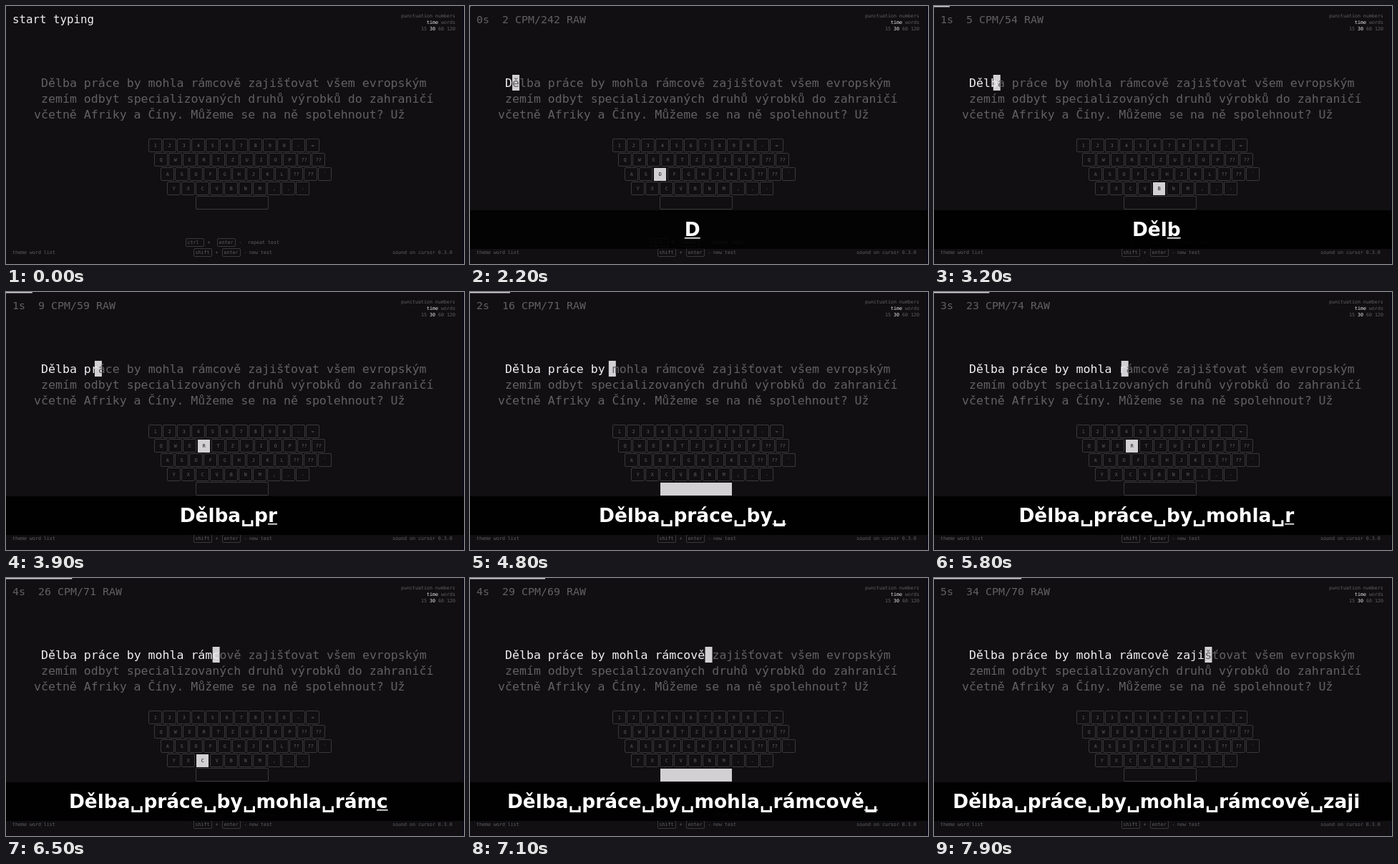
Animation, 640 px wide and 360 px high, one loop 8 s. Source, as an HTML page with a canvas:

```html
<!DOCTYPE html>
<html lang="cs">
<head>
<meta charset="utf-8">
<title>Typing test</title>
<style>
  html, body { margin: 0; width: 100%; height: 100%; overflow: hidden; background: #110f12; }
  canvas { display: block; width: 640px; height: 360px; }
</style>
</head>
<body>
<canvas id="stage" width="640" height="360"></canvas>
<script>
const ctx = document.getElementById('stage').getContext('2d');

const LOOP = 8000, STEP = 100;
const BG = '#110f12', DIM = '#626063', LINE = '#3a383b', LIGHT = '#f0eef1', FILL = '#d2d0d3';
const ADVANCE = 1233 / 2048;   // monospace advance in em
const PITCH = 9.98;

const LINES = [
  [49, 113, 'Dělba práce by mohla rámcově zajišťovat všem evropským'],
  [49, 135, 'zemím odbyt specializovaných druhů výrobků do zahraničí'],
  [39, 157, 'včetně Afriky a Číny. Můžeme se na ně spolehnout? Už']
];

const ROWS = [
  [199, 185, '1 2 3 4 5 6 7 8 9 0 - ='],
  [207, 205, 'Q W E R T Z U I O P ?? ??'],
  [216, 225, 'A S D F G H J K L ?? ?? `'],
  [225, 245, 'Y X C V B N M , . -']
];

// Press time of each key, in ms
const PRESSES = [
  2070, 2560, 2880, 3150, 3390, 3590, 3720, 3840, 4030, 4140, 4250,
  4350, 4450, 4560, 4740, 4930, 5040, 5140, 5240, 5350, 5460,
  5756, 6000, 6260, 6480, 6640, 6790, 6950, 7085, 7230, 7390, 7540, 7710
];
const HOLD = 130, DELAY = 20, GLIDE = 80;
const START = PRESSES[0] + 10;

function mono(text, x, y, color, pitch = 4) {
  ctx.font = `${pitch / ADVANCE}px "DejaVu Sans Mono", "Noto Sans Mono", monospace`;
  ctx.textAlign = 'left';
  ctx.fillStyle = color;
  ctx.fillText(text, x, y);
}

function box(x, y, w, h, lit) {
  if (lit) {
    ctx.fillStyle = FILL;
    ctx.fillRect(x + 1, y + 1, w - 2, h - 1);
    return;
  }
  ctx.strokeStyle = LINE;
  ctx.lineWidth = 1;
  ctx.beginPath();
  ctx.roundRect(x + 0.5, y + 0.5, w - 1, h - 1, 1.5);
  ctx.stroke();
}

const pressedBy = t => PRESSES.filter(p => p <= t).length;

function drawHeader(t) {
  if (t < START) {
    mono('start typing', 9, 24, LIGHT, 9.5);
  } else {
    const count = pressedBy(t - DELAY) + 1;
    const begin = t < 2500 ? START + 21 : START;
    const raw = Math.round(count * 12000 / Math.max(60, t - begin));
    const secs = Math.max(0, Math.floor((t - 2150) / 1000));
    mono(`${secs}s  ${count} CPM/${raw} RAW`, 9, 24, DIM, 9);
    ctx.fillStyle = FILL;
    ctx.fillRect(0, 0, Math.max(0, (t - 2175) * 640 / 30000), 1.5);
  }
  mono('punctuation numbers', 552, 16, DIM);
  mono('time', 588, 25, LIGHT);
  mono('words', 608, 25, DIM);
  mono('15', 580, 34, DIM);
  mono('30', 592, 34, LIGHT);
  mono('60 120', 604, 34, DIM);
}

function drawText(t) {
  const pos = pressedBy(t - DELAY);
  const glide = pos ? Math.min(1, (t - DELAY - PRESSES[pos - 1]) / GLIDE) : 0;
  const blinkOn = t >= 280 && Math.floor((t - 280) * 3 / 1000) % 2 === 0;
  if (t >= START || blinkOn) {
    ctx.fillStyle = FILL;
    ctx.fillRect(49.1 + PITCH * (pos ? pos - 1 + glide : 0), 96, 10, 22);
  }
  LINES.forEach(([x, y, text], i) => {
    const done = i ? 0 : pos;
    mono(text.slice(0, done), x, y, LIGHT, PITCH);
    mono(text.slice(done), x + done * PITCH, y, DIM, PITCH);
  });
}

function drawKeyboard(held) {
  for (const [x0, y, labels] of ROWS) {
    labels.split(' ').forEach((label, i) => {
      const x = x0 + i * 20, lit = label === held;
      box(x, y, 19, 19, lit);
      mono(label, x + 9.7 - label.length * 2, y + 12, lit ? BG : DIM);
    });
  }
  box(265, 265, 102, 19, held === ' ');
}

function hint(x, y, key, enterX, action, actionX) {
  box(x, y - 8, 26, 12);
  mono(key, x + 2.5, y, DIM);
  mono('+', x + 30.5, y, DIM);
  box(enterX, y - 8, 26, 12);
  mono('enter', enterX + 2.5, y, DIM);
  mono('-', enterX + 30.5, y, DIM);
  mono(action, actionX, y, DIM);
}

function drawFooter() {
  hint(251, 332, 'ctrl', 295, 'repeat test', 338);
  hint(262, 346, 'shift', 302, 'new test', 340);
  mono('theme word list', 9, 346, DIM);
  mono('sound on cursor 0.3.0', 540, 346, DIM);
}

function drawOverlay(t, count, isHeld) {
  ctx.fillStyle = `rgba(0,0,0,${t < 2250 ? 0.82 : 0.94})`;
  ctx.fillRect(0, 285, 640, 54);
  const text = LINES[0][2].slice(0, count).replace(/ /g, '␣');
  ctx.font = 'bold 26.4px "DejaVu Sans", sans-serif';
  ctx.textAlign = 'left';
  ctx.fillStyle = '#fff';
  const width = ctx.measureText(text).width, x = 310.8 - width / 2;
  ctx.fillText(text, x, 321);
  if (isHeld) {
    const last = ctx.measureText(text.slice(-1)).width;
    ctx.fillRect(x + width - last, 323, last, 1.5);
  }
}

function draw(t) {
  const count = pressedBy(t);
  const isHeld = count > 0 && t - PRESSES[count - 1] <= HOLD;
  const held = isHeld ? LINES[0][2][count - 1].toUpperCase() : '';
  ctx.fillStyle = BG;
  ctx.fillRect(0, 0, 640, 360);
  ctx.fillStyle = '#090816';
  ctx.fillRect(638, 0, 2, 360);
  drawHeader(t);
  drawText(t);
  drawKeyboard(held);
  drawFooter();
  if (count) drawOverlay(t, count, isHeld);
}

const origin = performance.now();
function tick() {
  const t = (performance.now() - origin) % LOOP;
  draw(Math.floor(t / STEP) * STEP);
  requestAnimationFrame(tick);
}
tick();
</script>
</body>
</html>
```
